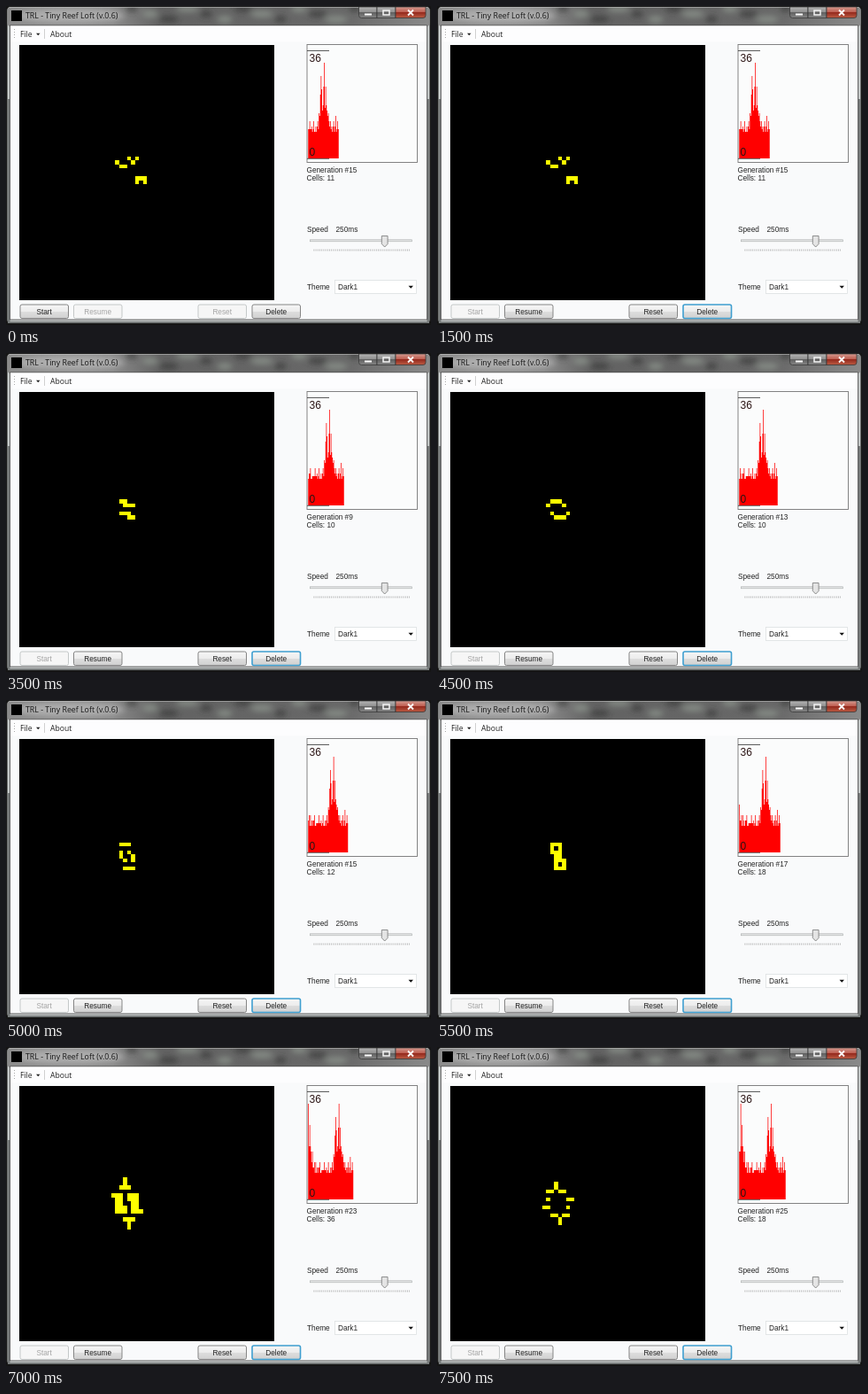
These frames come from a looping animation (480x360 px, 8 s). An HTML page:

```html
<!DOCTYPE html>
<html lang="en">
<head>
<meta charset="utf-8">
<title>Cell life</title>
<style>
html, body { margin: 0; width: 100%; height: 100%; overflow: hidden; background: #fff; }
svg { display: block; width: 480px; height: 360px; }
text { font: 8.25px "Liberation Sans", Arial, sans-serif; fill: #222; }
.ui { font: 8.6px "Open Sans", sans-serif; }
.title { font-size: 8.8px; fill: #161616; }
.scale { font-size: 12px; fill: #2a1414; }
.btn text { text-anchor: middle; }
.btn rect { fill: url(#face); stroke: #858585; }
.btn.off rect { fill: #f6f6f6; stroke: #c4c8c8; }
.btn.off text { fill: #a4a4a4; }
.btn.hot rect { fill: url(#hotFace); stroke: #4a8db4; }
.btn.focus rect { stroke: #3f9fd0; stroke-width: 1.6; }
.crisp { shape-rendering: crispEdges; }
</style>
</head>
<body>
<svg viewBox="0 0 480 360" xmlns="http://www.w3.org/2000/svg">
  <defs>
    <linearGradient id="bar">
      <stop offset="0" stop-color="#8c8c8c"/>
      <stop offset=".25" stop-color="#8a8a8a"/>
      <stop offset=".36" stop-color="#626262"/>
      <stop offset=".8" stop-color="#686868"/>
      <stop offset="1" stop-color="#8a8a8a"/>
    </linearGradient>
    <linearGradient id="face" x2="0" y2="1">
      <stop offset="0" stop-color="#f6f6f6"/>
      <stop offset=".5" stop-color="#ececec"/>
      <stop offset=".5" stop-color="#dedede"/>
      <stop offset="1" stop-color="#d0d0d0"/>
    </linearGradient>
    <linearGradient id="hotFace" x2="0" y2="1">
      <stop offset="0" stop-color="#ebf6fc"/>
      <stop offset=".5" stop-color="#d9f0fb"/>
      <stop offset=".5" stop-color="#bfe6fb"/>
      <stop offset="1" stop-color="#a8daf4"/>
    </linearGradient>
    <linearGradient id="gray" x2="0" y2="1">
      <stop offset="0" stop-color="#b4b4b4"/>
      <stop offset=".5" stop-color="#8e8e8e"/>
      <stop offset=".5" stop-color="#606060"/>
      <stop offset="1" stop-color="#868686"/>
    </linearGradient>
    <linearGradient id="red" x2="0" y2="1">
      <stop offset="0" stop-color="#d59a90"/>
      <stop offset=".5" stop-color="#bd5a4c"/>
      <stop offset=".5" stop-color="#94281c"/>
      <stop offset="1" stop-color="#bc5c44"/>
    </linearGradient>
    <filter id="soft" x="-50%" y="-100%" width="200%" height="300%"><feGaussianBlur stdDeviation="3"/></filter>
    <clipPath id="barClip"><rect x="1" y="1" width="478" height="21"/></clipPath>
  </defs>

  <!-- window frame -->
  <rect width="480" height="360" fill="#161616"/>
  <rect x="1.5" y="1" width="477" height="357" rx="4" fill="#c4c8c8"/>
  <path d="M2 105h2.5v251h471V105H478v253H2z" fill="#777b7b"/>
  <rect x="1.5" y="1" width="477" height="22" rx="4" fill="url(#bar)"/>
  <g clip-path="url(#barClip)">
    <g id="blobs" filter="url(#soft)"></g>
    <ellipse cx="72" cy="11" rx="62" ry="8" fill="#b8b8b8" opacity=".75" filter="url(#soft)"/>
    <path d="M4 1.3H476" stroke="#c8c8c8" stroke-width=".7"/>
  </g>
  <rect x="4.5" y="22" width="471" height="332" fill="#f9fafb" stroke="#444" stroke-width=".8"/>
  <rect x="5" y="22.5" width="470" height="18" fill="#fdfdfe"/>
  <rect x="6" y="5" width="12" height="12" fill="#000"/>
  <text class="ui title" x="22" y="14">TRL - Tiny Reef Loft (v.0.6)</text>

  <g stroke="#383838" stroke-width=".8">
    <path d="M398.500 1H419V13.500H401.500Q398.500 13.500 398.500 10.500Z" fill="url(#gray)"/>
    <path d="M419 1H440V13.500H419Z" fill="url(#gray)"/>
    <path d="M440 1H474V10.500Q474 13.500 471 13.500H440Z" fill="url(#red)"/>
  </g>
  <path d="M405 9.500h8" stroke="#fff" stroke-width="2"/>
  <rect x="426" y="5" width="7" height="5" fill="none" stroke="#f4f4f4" stroke-width="1.500"/>
  <path d="M454 4.500l6 6m0-6l-6 6" stroke="#fff" stroke-width="1.800"/>

  <!-- menu -->
  <path d="M9.500 26v11" stroke="#aaa" stroke-dasharray="1 2"/>
  <text class="ui" x="16" y="34.500">File</text>
  <path d="M34 30.800h4.500l-2.250 2.500z" fill="#222"/>
  <path d="M43.500 26v11" stroke="#c4c4c4" stroke-width=".8"/>
  <text class="ui" x="50" y="34.500">About</text>

  <rect class="crisp" x="15" y="43.500" width="288" height="288" fill="#000"/>
  <path id="cells" class="crisp" fill="#ff0"/>

  <!-- history chart -->
  <rect x="340" y="43.500" width="124.500" height="133" fill="#fbfcfc" stroke="#777" stroke-width=".9"/>
  <path id="bars" fill="#f00"/>
  <path d="M340 50.500h25M340 172.300h25" stroke="#333" stroke-width=".8"/>
  <text id="top" class="scale" x="342.500" y="62.500"></text>
  <text class="scale" x="342.500" y="169">0</text>
  <text id="gen" x="339.500" y="187.500"></text>
  <text id="count" x="339.500" y="197.300"></text>

  <!-- speed -->
  <text x="340" y="254.500">Speed</text>
  <text x="372.500" y="254.500">250ms</text>
  <rect x="343.500" y="263.800" width="115" height="2" fill="#e4e6e6" stroke="#a8acac" stroke-width=".6"/>
  <path d="M424.300 259.500h6.800v9l-3.400 3.500l-3.400-3.500z" fill="#e4e4e4" stroke="#777" stroke-width=".8"/>
  <path d="M347.500 275.500H456" stroke="#aaa" stroke-width="2" stroke-dasharray=".8 1.400"/>

  <!-- theme -->
  <text x="340" y="319.500">Theme</text>
  <rect x="371.500" y="309.500" width="92" height="15" fill="#fff" stroke="#dde0e2" stroke-width=".8"/>
  <text x="375" y="319.500">Dark1</text>
  <path d="M454.500 315.800h5.500l-2.750 3z" fill="#111"/>

  <g id="buttons"></g>
</svg>
<script>
const LOOP = 8000, CELL = 4.5, STEP = 0.75;
const get = id => document.getElementById(id);

// Live cells as row: columns
const seed = { 28: [27, 29], 29: [24, 28], 30: [25, 26], 33: [29, 30, 31], 34: [29, 31] };
// Earlier population counts, newest first
const past = [11, 14, 11, 11, 12, 10, 11, 14, 10, 10, 12, 10, 12, 14, 11, 17, 16, 24, 31, 26,
  18, 20, 27, 36, 19, 27, 20, 18, 16, 17, 14, 12, 14, 11, 12, 10, 12, 14, 10, 12, 16, 10, 11, 14, 11];

const key = (r, c) => r * 64 + c;

function evolve(live) {
  const near = new Map();
  for (const k of live)
    for (let r = -1; r <= 1; r++)
      for (let c = -1; c <= 1; c++)
        if (r || c) {
          const n = k + key(r, c);
          near.set(n, (near.get(n) || 0) + 1);
        }
  return new Set([...near].filter(([k, n]) => n === 3 || (n === 2 && live.has(k))).map(([k]) => k));
}

const states = [new Set(Object.entries(seed).flatMap(([r, cols]) => cols.map(c => key(+r, c))))];
while (states.length < 25) states.push(evolve(states[states.length - 1]));

const buttons = [["Start", 16], ["Resume", 76.5], ["Reset", 217], ["Delete", 278]].map(([name, x]) => {
  const g = document.createElementNS("http://www.w3.org/2000/svg", "g");
  g.innerHTML = `<rect x="${x}" y="337" width="54.5" height="15.5" rx="2"/><text x="${x + 27.2}" y="347.800">${name}</text>`;
  get("buttons").append(g);
  return g;
});

// Blurred desktop showing through the title bar
get("blobs").innerHTML = Array.from({ length: 13 }, (_, i) =>
  `<ellipse cx="${142 + i * 21}" cy="${i % 3 * 6 + 3}" rx="${7 + i % 4 * 2}" ry="4" fill="${i % 2 ? "#949c94" : "#353735"}" opacity=".65"/>`
).join("");

function buttonModes(t) {
  if (t < 1000) return ["", "off", "off", ""];
  if (t < 1500) return ["hot", "off", "off", ""];
  return ["off", "", "", "focus"];
}

function draw(t) {
  const gen = t < 2000 ? 0 : 2 + 2 * Math.floor((t - 2000) / 500);
  const live = states[gen];
  const history = [...states.slice(0, gen + 1).map(s => s.size).reverse(), ...past];

  get("cells").setAttribute("d", [...live].map(k =>
    `M${15 + k % 64 * CELL} ${43.5 + Math.floor(k / 64) * CELL}h${CELL}v${CELL}h-${CELL}z`).join(""));
  get("bars").setAttribute("d", "M341.25 172" +
    history.map(n => `V${172 - n * 3}h${STEP}`).join("") + "V172z");
  get("top").textContent = Math.max(...history);
  get("gen").textContent = "Generation #" + (gen ? gen + 1 : 15);
  get("count").textContent = "Cells: " + live.size;
  buttonModes(t).forEach((mode, i) => buttons[i].setAttribute("class", "btn " + mode));
}

function tick() {
  draw(performance.now() % LOOP);
  requestAnimationFrame(tick);
}
tick();
</script>
</body>
</html>
```
